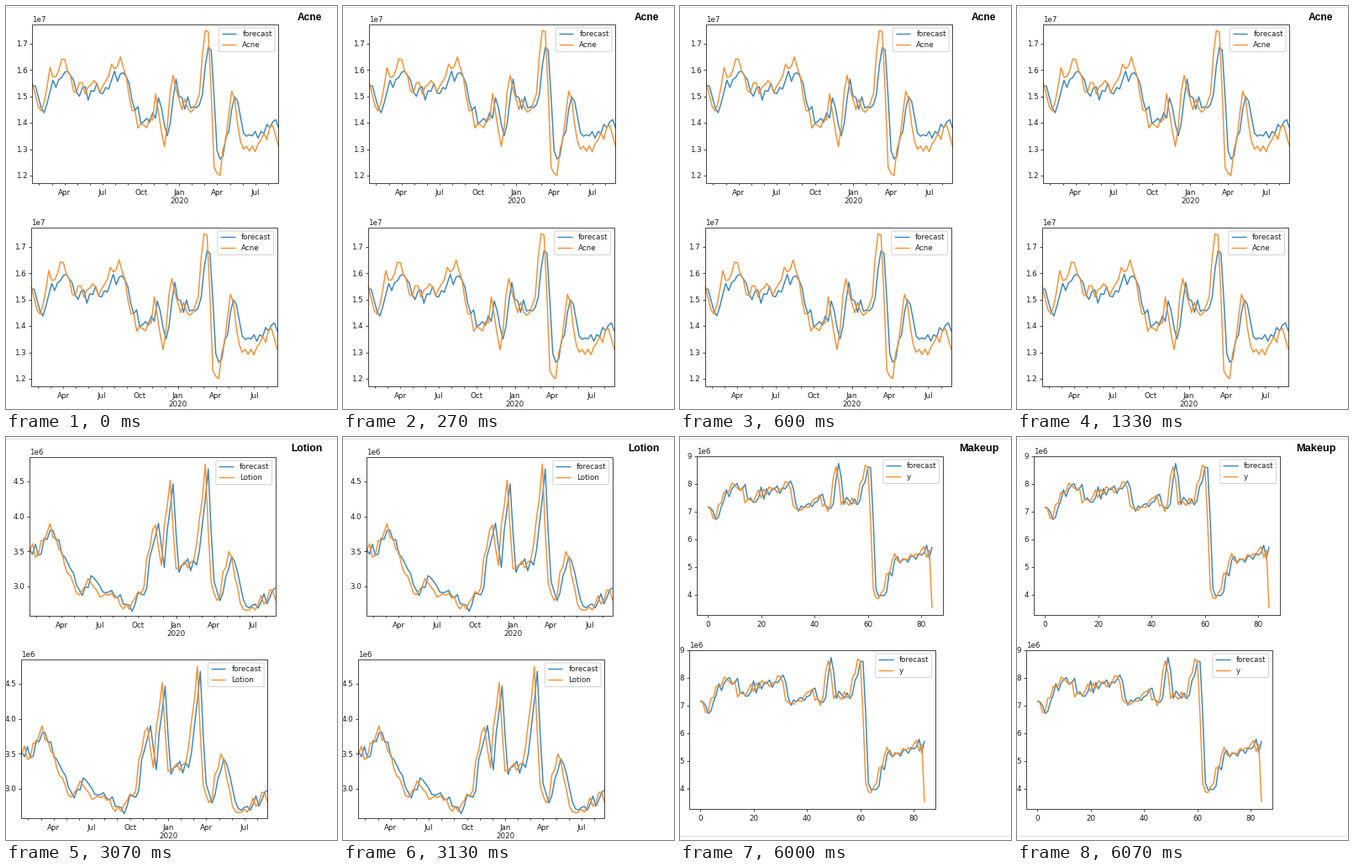
A matplotlib script for the animation above (8990 ms loop, 394 by 480 pixels).

```python
import matplotlib.pyplot as plt
import numpy as np
from matplotlib.animation import FuncAnimation
from matplotlib.patches import FancyBboxPatch, Rectangle

W, H, DPI = 394, 480, 100
STEP, LOOP = 10, 8990
CUTS = (3000, 6000)
PX = 72 / DPI                  # points per pixel
FONT = 8.8
BLUE, ORANGE, INK, RULE = "#3a85be", "#f68f2f", "#1c1c1c", "#dedede"
PW, PH = 293, 189.6            # plot size
WEEKS = np.arange(85)

fig = plt.figure(figsize=(W / DPI, H / DPI), dpi=DPI, facecolor="white")
ax = fig.add_axes([0, 0, 1, 1])
ax.set_xlim(0, W)
ax.set_ylim(H, 0)
ax.axis("off")


def demand(turns, jitter, seed):
    """Weekly demand: straight runs between turning points, with random wiggle."""
    weeks, values = zip(*turns)
    wiggle = np.random.default_rng(seed).uniform(-jitter, jitter, len(WEEKS))
    wiggle[list(weeks)] = 0
    return np.interp(WEEKS, weeks, values) + wiggle


def predict(y, keep, jitter, seed):
    """Last week's demand, pulled towards the mean, with a little noise."""
    last = np.r_[y[0], y[:-1]]
    noise = np.random.default_rng(seed).uniform(-jitter, jitter, len(y))
    return y.mean() + keep * (last - y.mean()) + noise


class Scene:
    """A group of artists in pixel coordinates that shows or hides as one."""

    def __init__(self):
        self.parts = []

    def show(self, on):
        for part in self.parts:
            part.set_visible(on)

    def text(self, x, y, s, ha="center", size=FONT, **kw):
        kw = {"family": "DejaVu Sans", "color": INK, **kw}
        self.parts.append(ax.text(x, y, s, ha=ha, va="baseline",
                                  fontsize=size * PX, **kw))

    def line(self, xs, ys, color, width, **kw):
        self.parts += ax.plot(xs, ys, color=color, lw=width * PX,
                              solid_joinstyle="round", solid_capstyle="butt", **kw)

    def patch(self, shape):
        self.parts.append(ax.add_patch(shape))

    def title(self, x, s, size):
        self.text(x, 17.4, s, "left", size=size, color="black",
                  family="Liberation Sans", weight="bold")

    def rule(self, y):
        self.line([0, W], [y, y], RULE, 1)

    def ticks(self, marks):
        """Draw (x, y, dx, dy) marks as a single broken line."""
        xs = [v for x, y, dx, dy in marks for v in (x, x + dx, np.nan)]
        ys = [v for x, y, dx, dy in marks for v in (y, y + dy, np.nan)]
        self.line(xs, ys, INK, 0.8)

    def legend(self, right, top, name):
        x, y = right - 71.2, top + 4.6
        self.patch(FancyBboxPatch(
            (x + 1.8, y + 1.8), 63.2, 24.8, boxstyle="round,pad=1.8",
            fc=(1, 1, 1, 0.8), ec="#cfcfcf", lw=0.9 * PX, zorder=3))
        rows = ((11.7, BLUE, "forecast"), (24.6, ORANGE, name))
        for dy, color, label in rows:
            self.line([x + 3.5, x + 21.1], [top + dy] * 2, color, 1.4, zorder=4)
            self.text(x + 28, top + dy + 3.1, label, "left", zorder=4)

    def index_axis(self, xs, bottom, base):
        for i in range(0, 81, 20):
            self.text(xs[i], base, str(i))
        return [(xs[i], bottom, 0, 3.1) for i in range(0, 81, 20)]

    def month_axis(self, left, bottom, base):
        marks = []
        for m in range(-2, 17):
            x = left + 38.2 + 15.15 * m
            marks.append((x, bottom, 0, 3.1 if m == 9 else 1.8))
            if m >= 0 and m % 3 == 0:
                self.text(x, base, ("Apr", "Jul", "Oct", "Jan")[m // 3 % 4])
            if m == 9:
                self.text(x, base + 9.6, "2020")
        return marks

    def plot(self, left, top, spec):
        right, bottom = left + PW, top + PH
        base = bottom + 13.9

        def ypos(v):
            return top + spec["ref_dy"] + (spec["ref"] - v) * spec["unit"]

        margin = 13 if spec["index"] else 0
        xs = np.linspace(left + margin, right - margin, len(WEEKS))
        self.line(xs, ypos(spec["fc"]), BLUE, 1.45)
        self.line(xs, ypos(spec["y"]), ORANGE, 1.45)
        self.patch(Rectangle((left, top), PW, PH, fill=False,
                             ec=INK, lw=0.8 * PX, zorder=2.5))

        if spec["index"]:
            marks = self.index_axis(xs, bottom, base)
        else:
            marks = self.month_axis(left, bottom, base)
        for v, label in spec["yticks"]:
            marks.append((left, ypos(v), -3.1, 0))
            self.text(left - 6.1, ypos(v) + 3.3, label, "right")
        self.ticks(marks)
        self.text(left, top - 2.3, spec["exp"], "left")
        self.legend(right, top, spec["name"])


def build(title, title_x, size, rules, places, turns, jitter, keep, seed, **spec):
    scene = Scene()
    for y in rules:
        scene.rule(y)
    scene.title(title_x, title, size)
    spec["y"] = demand(turns, jitter, seed)
    spec["fc"] = predict(spec["y"], keep, jitter / 2, seed + 1)
    for left, top in places:
        scene.plot(left, top, spec)
    return scene


# Turning points are (week, millions)
scenes = [
    build("Acne", 346.5, 12, [0.5], [(31.5, 21.5), (30, 263.5)],
          turns=[(0, 15.5), (2, 14.6), (4, 14.8), (6, 16.1), (8, 15.75),
                 (11, 16.4), (14, 15.2), (24, 15.4), (30, 16.5), (33, 15.0),
                 (36, 13.8), (41, 14.1), (42, 15.1), (45, 13.1), (48, 15.8),
                 (50, 14.9), (54, 14.4), (57, 15.1), (59, 17.5), (60, 17.45),
                 (62, 12.3), (64, 12.0), (68, 15.2), (72, 13.0), (77, 13.2),
                 (82, 13.9), (84, 13.1)],
          jitter=0.3, keep=0.75, seed=4,
          name="Acne", exp="1e7", index=False, unit=31.4, ref=17, ref_dy=23.4,
          yticks=[(v, f"{v / 10:.1f}") for v in range(12, 18)]),
    build("Lotion", 339.5, 12.1, [1.5], [(28, 23.5), (18.5, 264.5)],
          turns=[(0, 3.5), (3, 3.45), (7, 3.9), (11, 3.5), (14, 3.15),
                 (17, 2.88), (21, 3.05), (33, 2.75), (38, 2.9), (43, 3.88),
                 (45, 3.3), (46, 3.88), (48, 4.52), (50, 3.25), (55, 3.35),
                 (57, 3.6), (60, 4.75), (62, 3.05), (64, 2.8), (68, 3.5),
                 (72, 2.75), (80, 2.75), (82, 2.95), (84, 2.8)],
          jitter=0.13, keep=0.95, seed=8,
          name="Lotion", exp="1e6", index=False, unit=83.4, ref=4.5, ref_dy=29.5,
          yticks=[(v, f"{v:.1f}") for v in (3.0, 3.5, 4.0, 4.5)]),
    build("Makeup", 332.3, 12.8, [1.5, 475], [(20, 22.5), (11, 253.5)],
          turns=[(0, 7.15), (2, 6.75), (6, 7.7), (11, 7.85), (15, 7.45),
                 (28, 7.8), (30, 8.05), (33, 7.1), (42, 7.6), (45, 7.0),
                 (48, 8.62), (50, 7.25), (56, 7.35), (59, 8.68), (60, 8.6),
                 (62, 4.2), (64, 3.85), (69, 5.2), (76, 5.45), (83, 5.6),
                 (84, 3.5)],
          jitter=0.25, keep=1, seed=15,
          name="y", exp="1e6", index=True, unit=32.9, ref=9, ref_dy=0.5,
          yticks=[(v, str(v)) for v in range(4, 10)]),
]


def update(frame):
    now = sum(frame * STEP >= cut for cut in CUTS)
    for i, scene in enumerate(scenes):
        scene.show(i == now)
    return []


def reset():
    return update(0)


anim = FuncAnimation(fig, update, frames=LOOP // STEP, init_func=reset,
                     interval=STEP, repeat=True, repeat_delay=0, blit=False)
plt.show()
```
